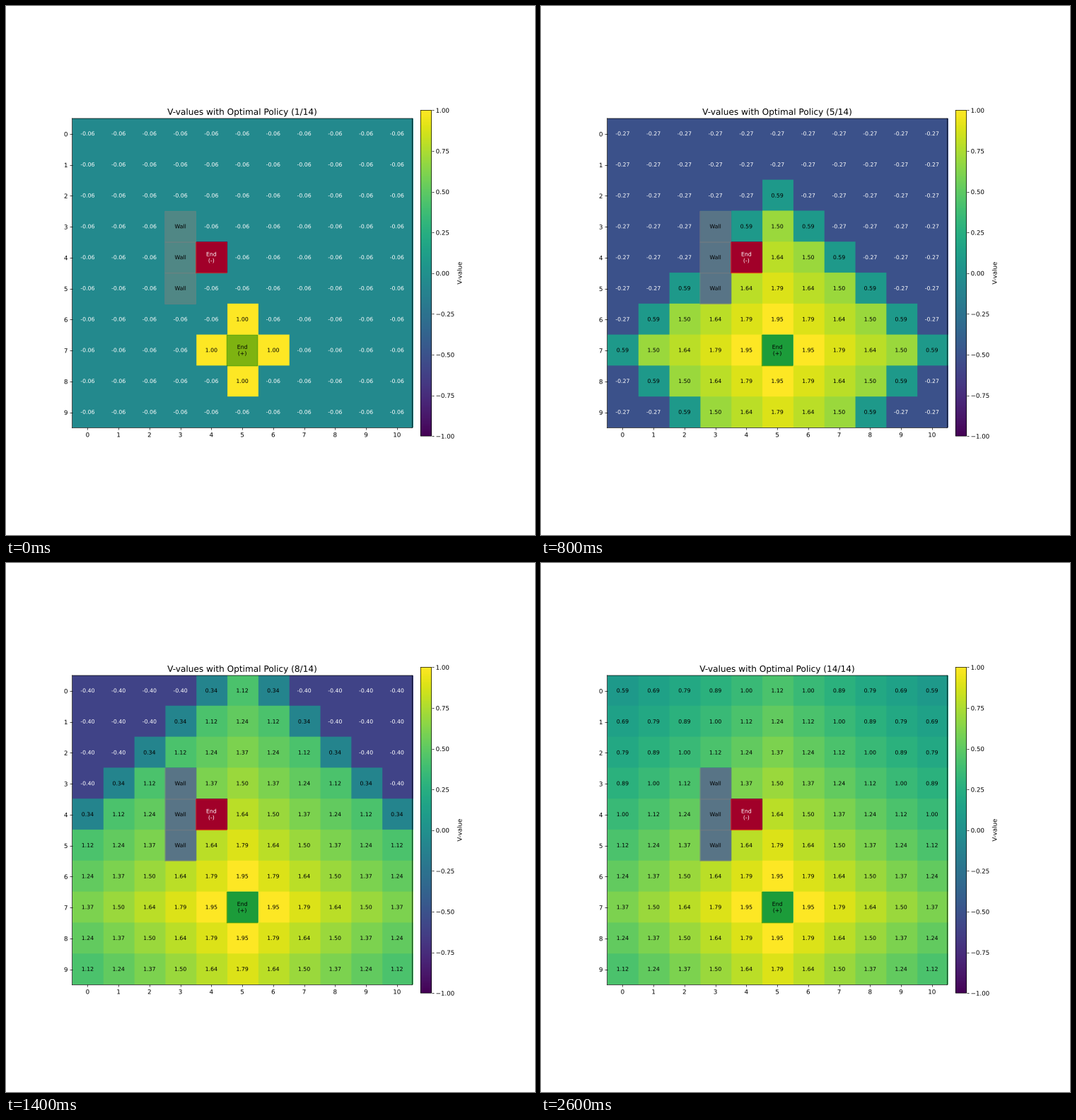
A matplotlib script for the animation above (2.8 s loop, 748x748 px).

```python
import numpy as np
import matplotlib.pyplot as plt
from matplotlib.animation import FuncAnimation
from matplotlib.cm import ScalarMappable
from matplotlib.colors import Normalize
from matplotlib.patches import Rectangle
from matplotlib.patheffects import Normal

ROWS, COLS, STEPS = 10, 11, 14
GAMMA, STEP_COST = 0.95, -0.06
WALLS = [(3, 3), (4, 3), (5, 3)]
ENDS = {(4, 4): -1.0, (7, 5): 1.0}
MOVES = [(-1, 0), (1, 0), (0, -1), (0, 1)]
FINE = np.ones((96, 96))


def best_value(values, row, col):
    """Best one-step return; blocked moves stay in place."""
    options = []
    for dr, dc in MOVES:
        r, c = row + dr, col + dc
        if not (0 <= r < ROWS and 0 <= c < COLS) or (r, c) in WALLS:
            r, c = row, col
        options.append(ENDS.get((r, c), STEP_COST) + GAMMA * values[r, c])
    return max(options)


def iterate():
    values = np.zeros((ROWS, COLS))
    history = []
    for _ in range(STEPS):
        new = np.zeros_like(values)
        for cell in np.ndindex(ROWS, COLS):
            if cell in ENDS:
                new[cell] = ENDS[cell]
            elif cell not in WALLS:
                new[cell] = best_value(values, *cell)
        values = new
        history.append(values)
    return history


def label(cell, value):
    if cell in WALLS:
        return "Wall"
    if cell in ENDS:
        return "End\n(+)" if value > 0 else "End\n(-)"
    return f"{value:.2f}"


history = iterate()

# Place lines and glyphs at fractions of a pixel, with soft edges
plt.rcParams.update({
    "font.family": "DejaVu Sans",
    "text.hinting": "none",
    "path.snap": False,
    "path.effects": [Normal()],
})

fig, ax = plt.subplots(figsize=(12, 12), dpi=748 / 12)
image = ax.imshow(np.kron(history[0], FINE), cmap="viridis",
                  extent=(-0.5, COLS - 0.5, ROWS - 0.5, -0.5),
                  interpolation="hanning", interpolation_stage="rgba")
ax.set_xticks(range(COLS))
ax.set_yticks(range(ROWS))
title = ax.set_title("", fontsize=14)

scale = ScalarMappable(Normalize(-1, 1), "viridis")
fig.colorbar(scale, ax=ax, label="V-value", shrink=0.8, pad=0.02, aspect=30)


def tint(cell, color):
    row, col = cell
    ax.add_patch(Rectangle((col - 0.5, row - 0.5), 1, 1, color=color, alpha=0.5))


for wall in WALLS:
    tint(wall, "gray")
for end, reward in ENDS.items():
    tint(end, "green" if reward > 0 else "red")

texts = {
    (r, c): ax.text(c, r, "", ha="center", va="center", fontsize=9)
    for r, c in np.ndindex(ROWS, COLS)
}


def update(step):
    values = history[step]
    image.set_data(np.kron(values, FINE))
    image.set_clim(values.min(), values.max())
    title.set_text(f"V-values with Optimal Policy ({step + 1}/{STEPS})")
    for cell, text in texts.items():
        value = values[cell]
        text.set_text(label(cell, value))
        text.set_color("white" if value < 0 else "black")
    return [image, title, *texts.values()]


anim = FuncAnimation(fig, update, frames=STEPS, interval=200,
                     repeat=True, repeat_delay=0, blit=False)
plt.show()
```
